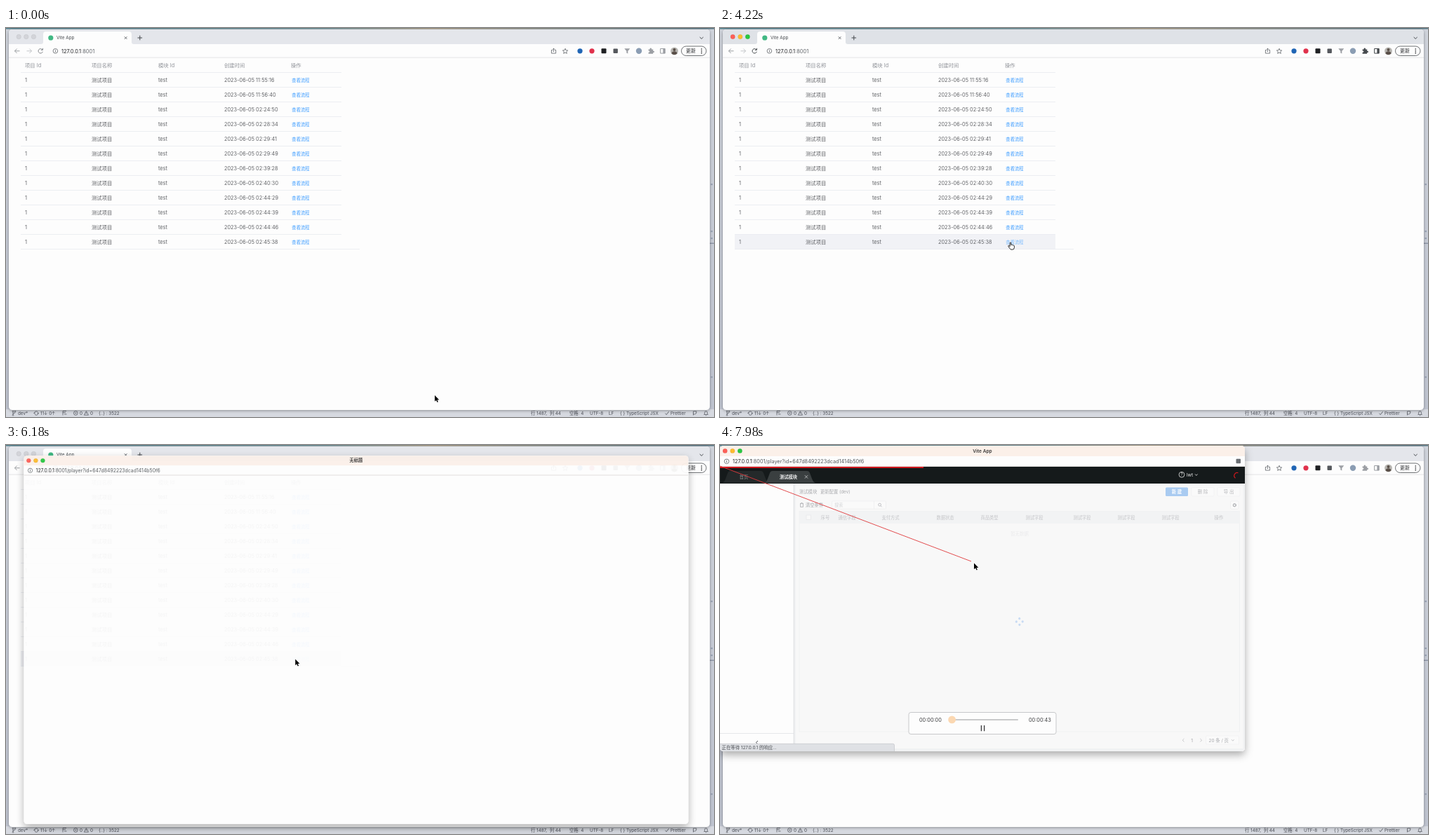
Animation, 1009 px wide and 555 px high, one loop 8000 ms. Source, as an HTML page:

```html
<!DOCTYPE html>
<html lang="zh">
<head>
<meta charset="utf-8">
<title>Vite App</title>
<style>
  html, body { margin: 0; width: 100%; height: 100%; overflow: hidden; background: #d5d8df; }
  svg { display: block; width: 100vw; height: 100vh; }
  text { font-family: Inter, "Noto Sans CJK SC", "Noto Sans CJK", sans-serif; white-space: pre; }
</style>
</head>
<body>
<svg id="stage" viewBox="0 0 1009 555">
  <defs>
    <linearGradient id="strip">
      <stop offset="0" stop-color="#53808c"/><stop offset=".45" stop-color="#6f9096"/>
      <stop offset=".6" stop-color="#a89c86"/><stop offset="1" stop-color="#587683"/>
    </linearGradient>
    <linearGradient id="edge" x2="0" y2="1">
      <stop offset="0" stop-color="#d0d4dc"/><stop offset="1" stop-color="#bfc4d0"/>
    </linearGradient>
    <filter id="shadow" x="-10%" y="-10%" width="120%" height="125%">
      <feDropShadow dx="0" dy="5" stdDeviation="6" flood-opacity=".32"/>
    </filter>
    <filter id="soft" x="-5%" y="-5%" width="110%" height="110%">
      <feDropShadow dx="0" dy="1" stdDeviation="2" flood-opacity=".35"/>
    </filter>
    <clipPath id="frame"><rect id="frameBox" y="1" rx="5"/></clipPath>
  </defs>
</svg>
<script>
const NS = 'http://www.w3.org/2000/svg';
const stage = document.getElementById('stage');
const frameBox = document.getElementById('frameBox');
let layer = stage;

function el(tag, attrs, parent = layer) {
  const node = document.createElementNS(NS, tag);
  set(node, attrs);
  return parent.appendChild(node);
}
function set(node, attrs) {
  for (const k in attrs) node.setAttribute(k, attrs[k]);
}
// Runs a drawing function inside a new group
function group(draw, attrs = {}, parent = layer) {
  const outer = layer, g = el('g', attrs, parent);
  layer = g;
  draw();
  layer = outer;
  return g;
}
const show = (node, on) => { node.style.display = on ? '' : 'none'; };
const rect = (x, y, width, height, fill, more) => el('rect', { x, y, width, height, fill, ...more });
const dot = (cx, cy, r, fill, more) => el('circle', { cx, cy, r, fill, ...more });
const line = (d, stroke, width = 1, more) =>
  el('path', { d, stroke, 'stroke-width': width, fill: 'none', ...more });
const shape = (d, fill, more) => el('path', { d, fill, ...more });
// y is the middle of the line of text
function text(x, y, str, size, fill, more) {
  const node = el('text', { x, y: y + size * 0.365, 'font-size': size, fill, ...more });
  node.textContent = str;
  return node;
}
const mid = { 'text-anchor': 'middle' };
const bold = { 'font-weight': 600 };

function lights(x, y, gap, colors, ring) {
  colors.forEach((c, i) => dot(x + gap * i, y, 3.2, c, { stroke: ring, 'stroke-width': 0.5 }));
}
const LIT = ['#ff5f57', '#febc2e', '#28c840'];
const DIM = ['#d3d4d9', '#d3d4d9', '#d3d4d9'];

function info(x, y, c) {
  dot(x, y, 3.3, 'none', { stroke: c, 'stroke-width': 0.8 });
  line(`M${x} ${y - 0.5}v2.2M${x} ${y - 2}v.9`, c, 0.9);
}

// ---- Editor behind the browser ----
rect(0, 0, 1009, 555, 'url(#edge)');
rect(0, 544, 1009, 11, '#d6d9e0');
rect(0, 0, 1009, 1.6, 'url(#strip)');
for (const y of [223, 290, 300, 498]) rect(1004.5, y - 1, 2.5, 2.2, '#9aa3b5');
rect(1003, 306.5, 6, 1.5, '#8d95a6');

const INK = '#4a4d55';
const status = (x, str) => text(x, 549.5, str, 6.3, INK);
status(17, 'dev*'); status(49, '11↓ 0↑'); status(105, '0'); status(120, '0');
status(132, '{..} : 3522'); status(748, '行 1487,  列 44'); status(803, '空格: 4');
status(832, 'UTF-8'); status(859, 'LF'); status(875, '{ }'); status(884, 'TypeScript JSX');
status(947, 'Prettier');
line('M10 548v3.5M13 548q0 2-3 2', INK, 0.7);
for (const [x, y] of [[10, 547], [13, 547], [10, 552.3]]) dot(x, y, 0.9, 'none', { stroke: INK, 'stroke-width': 0.6 });
line('M40.5 549.5a2.6 2.6 0 0 1 5 -1M45.8 549.7a2.6 2.6 0 0 1 -5 1M39.3 549.5h2.4M44.6 549.6h2.4', INK, 0.7);
line('M81 546.5h5M81 548.7h4M83 551h3.5M81 546.5v6', INK, 0.7);
dot(99.3, 549.5, 2.9, 'none', { stroke: INK, 'stroke-width': 0.7 });
line('M98.2 548.4l2.2 2.2M100.4 548.4l-2.2 2.2M111.3 552.2h6.2l-3.1-5.5ZM114.4 548.7v1.6', INK, 0.7);
line('M939.5 549.8l1.7 1.9 3.4-4.4', INK, 0.8);
line('M979.5 547h4.5q0 4-2 4h-2.5ZM979.5 552.5v-2M994.8 551.5q1-1 1-3a1.8 1.8 0 0 1 3.6 0q0 2 1 3ZM997 552.8h1.2', INK, 0.7);

// ---- Browser window ----
rect(4, 2, 999, 543, '#fdfdfd', { rx: 5, filter: 'url(#soft)' });
const tabStrip = shape('M4 23V7a5 5 0 0 1 5-5H998a5 5 0 0 1 5 5V23Z', '#e4e6eb');
shape('M50 23q3 0 3-3V9q0-4 4-4H175q4 0 4 4V20q0 3 3 3Z', '#fdfdfd');
const dimLights = group(() => lights(18.2, 12.5, 10.6, DIM, '#c3c4c9'));
const litLights = group(() => lights(18.2, 12.5, 10.6, LIT, '#0002'));
dot(63.8, 14, 3.6, '#41b883');
text(72, 14, 'Vite App', 6.3, '#45494d');
line('M168.8 12.3l3.6 3.6M172.4 12.3l-3.6 3.6', '#55595e', 0.9);
line('M187.5 14h6.6M190.8 10.7v6.6', '#45494d', 1);
line('M988.7 13l2.5 2.4 2.5-2.4', '#45494d', 1);
rect(4, 41.7, 999, 0.8, '#dddee0');

const nav = (d, c) => line(d, c, 1);
nav('M19.5 32.8h-7M15.6 29.6l-3.2 3.2 3.2 3.2', '#9b9ea2');
nav('M29.5 32.8h7M33.4 29.6l3.2 3.2-3.2 3.2', '#c4c6c9');
const reload = nav('M51.9 31a3.2 3.2 0 1 0 .4 2.8M52.4 28.8v2.6h-2.6', '#85888c');
info(70.4, 32.8, '#5f6368');
text(79, 32.8, '127.0.0.1', 7.4, '#202124').innerHTML += '<tspan fill="#5f6368">:8001</tspan>';

line('M779 31.5h-1.6v4.6h6.2v-4.6H782M780.5 34v-4.8M778.9 30.7l1.6-1.6 1.6 1.6', '#5f6368', 0.8);
line('M797 29.3l1.1 2.5 2.6.2-2 1.8.6 2.6-2.3-1.4-2.3 1.4.6-2.6-2-1.8 2.6-.2Z', '#5f6368', 0.8);
dot(818, 32.8, 3.6, '#2065b5');
dot(835, 32.8, 3.6, '#e0314b');
rect(848.5, 29.3, 7, 7, '#1f2023', { rx: 1 });
rect(865.5, 29.6, 6.4, 6.4, '#55585d', { rx: 1 });
shape('M881.3 29.3h8l-3 3.6v3.6l-2-1v-2.6Z', '#9da0a5');
dot(902, 32.8, 4.2, '#8b9db3');
const extra = group(() => {
  shape('M915.6 30.6h2q-.5-2 1.2-2t1.2 2h2.2v2.3q1.8-.4 1.8 1t-1.8 1v1.8h-6.6v-2q1.8.2 1.8-1.1t-1.8-1.1Z', 'currentColor');
  line('M932.6 29.5h6.6v6.6h-6.6Z', 'currentColor', 1);
  rect(936.4, 29.5, 2.8, 6.6, 'currentColor');
});
dot(952.5, 32.8, 5.4, '#b7b5b1');
shape('M948.3 36.2q1-3 4.2-3t4.2 3a5.4 5.4 0 0 1-8.4 0Z', '#5a5049');
dot(952.5, 31, 2, '#5a5049');
rect(962.5, 26, 35.5, 13.5, '#fdfdfd', { rx: 6.75, stroke: '#5d6064', 'stroke-width': 0.9 });
text(969, 32.8, '更新', 7, '#26282b');
for (const y of [30, 32.8, 35.6]) dot(991.3, y, 0.85, '#26282b');

// ---- Project table ----
const COLS = [27, 122, 217, 311, 406];
const TIMES = ['11:55:16', '11:56:40', '02:24:50', '02:28:34', '02:29:41', '02:29:49',
  '02:39:28', '02:40:30', '02:44:29', '02:44:39', '02:44:46', '02:45:38'];
const hoverRow = rect(21, 294.5, 457, 21, '#f0f1f5');
['项目 Id', '项目名称', '模块 Id', '创建时间', '操作'].forEach((s, i) => text(COLS[i], 53, s, 7.35, '#909399'));
let link;
TIMES.forEach((time, i) => {
  const y = 74 + 21 * i;
  rect(21, y - 11, 457, 0.8, '#e9ebf1');
  ['1', '测试项目', 'test', '2023-06-05 ' + time].forEach((s, c) => text(COLS[c], y, s, 7.35, '#606266'));
  link = text(407.3, y + 0.3, '查看流程', 6.35, '#409eff', { 'font-weight': 500 });
});
rect(21, 315, 483, 0.8, '#e9ebf1');

// ---- Player popup ----
const GREY = '#c3c4c7';
let backing, urlBar, titleBar, title, page, blank, early, late, progress, spinner, loader, bubble, mark;
const popup = group(() => {
  backing = rect(0, 1, 998, 554, '#fdfdfd', { rx: 5, filter: 'url(#shadow)' });
  group(() => {
    blank = rect(0, 30, 998, 525, '#f1ebe8');
    titleBar = rect(0, 1, 998, 15, '#fbf0e9');
    urlBar = rect(0, 16, 998, 14, '#fdfdfd');
    lights(7.2, 8.4, 10.6, LIT, '#0002');
    title = text(499, 8.4, '', 6.6, '#3c3a39', { ...mid, ...bold });
    info(9.5, 23.3, '#5f6368');
    text(18, 23.3, '127.0.0.1', 7.3, '#202124')
      .innerHTML += '<tspan fill="#54585c">:8001/player?id=647d8492223dcad1414b50f6</tspan>';
    rect(0, 30, 998, 0.8, '#d9d6d5');
    page = group(drawPage);
  }, { 'clip-path': 'url(#frame)' });
});

function drawPage() {
  rect(0, 30.8, 748, 406.2, '#fdfdfd');
  rect(735.5, 19.8, 6.5, 6.5, '#6a6e73', { rx: 1 });
  rect(0, 31, 748, 24, '#151a1b');
  shape('M2 54q4 0 6-6l3-8q1-3 4-3H58q3 0 4 3l3 8q2 6 6 6Z', '#24292a');
  shape('M62 54q4 0 6-6l3-8q1-3 4-3H124q3 0 4 3l3 8q2 6 6 6Z', '#3a3f40');
  text(34, 45.3, '首页', 6.3, '#8f9495', mid);
  text(97.5, 45.3, '测试模块', 6.3, '#f2f2f2', { ...mid, ...bold });
  line('M120.8 43.2l4.4 4.4M125.2 43.2l-4.4 4.4', '#c9cccd', 0.8);
  dot(658, 42.3, 3.9, 'none', { stroke: '#eee', 'stroke-width': 0.8 });
  text(658, 42.3, '?', 6, '#eee', mid);
  text(665, 42.5, 'lwt', 6.6, '#eee');
  line('M677 41.5l1.8 2 1.8-2', '#eee', 0.8);
  progress = rect(0, 31, 60, 1.9, '#d9181e');
  spinner = line('M-3 3A4.3 4.3 0 0 1 3 -3', '#d2161c', 1.2);

  // Sidebar and main panel
  rect(104.8, 55, 1, 382, '#d5d6d9');
  rect(105.8, 55, 642.2, 382, '#f1f2f3');
  rect(108, 57, 637.5, 376, '#f8f8f8');
  rect(0, 411, 105, 0.8, '#e2e3e6');
  line('M54 422l-2.6 2.6 2.6 2.6', '#3c3f44', 0.9);
  rect(113, 94.5, 627.5, 314.5, 'none', { stroke: '#eeeff0', 'stroke-width': 0.8 });
  rect(113, 94.5, 627.5, 17.5, '#f2f3f4');
  rect(635, 60.5, 32, 12.5, '#a9cbf1', { rx: 1.5 });
  text(651, 66.8, '新 建', 6.4, '#fff', { ...mid, ...bold });
  for (const [x, s] of [[688, '删 除'], [725, '导 出']]) {
    rect(x - 16, 60.5, 32, 12.5, '#fafafa', { rx: 1.5, stroke: '#f0f0f1', 'stroke-width': 0.7 });
    text(x, 66.8, s, 6.4, '#b5b6b9', mid);
  }
  rect(727.5, 80, 11.5, 11.5, '#fafafa', { rx: 1.5, stroke: '#ececee', 'stroke-width': 0.7 });
  dot(733.3, 85.8, 2, 'none', { stroke: '#a9abaf', 'stroke-width': 1.2, 'stroke-dasharray': '1.2 .5' });
  dot(733.3, 85.8, 1.8, 'none', { stroke: '#a9abaf', 'stroke-width': 0.7 });
  text(150, 103.3, '序号', 6.4, GREY, mid);
  text(711, 103.3, '操作', 6.4, GREY, mid);
  text(427, 126.3, '暂无数据', 6.4, '#eaeaec', mid);

  early = group(() => {
    text(118, 66.8, '更新配置 (dev)', 6.3, '#c6c7ca', bold);
    text(118, 85.5, '搜索', 6.3, '#e3e4e6');
    dot(182, 85.3, 1.8, 'none', { stroke: '#e0e1e3', 'stroke-width': 0.7 });
    rect(137, 91, 55, 0.7, '#ececee');
    rect(690, 97, 48, 6, '#f8f8f8', { opacity: 0.6 });
    text(677, 421.2, '1', 6.6, '#dadbdd', mid);
    text(701, 421.2, '20 条/页', 6.4, '#cfd0d3');
    line('M665 419l-2 2 2 2M689 419l2 2-2 2M729 420l1.8 2 1.8-2', '#dadbdd', 0.7);
  });
  late = group(() => {
    text(113, 66.8, '测试模块', 6.3, '#a7a8ac');
    text(143, 66.8, '更新配置 (dev)', 6.3, '#a7a8ac');
    line('M114 83.6h5M114.6 83.6v4.8h3.8v-4.8M115.6 82.5h1.8', '#9fa1a5', 0.7);
    text(122, 85.7, '清空条件', 6.3, '#9fa1a5');
    rect(159.5, 80, 77, 11.3, '#fafafa', { rx: 1, stroke: '#ececee', 'stroke-width': 0.7 });
    rect(219, 80, 0.7, 11.3, '#ececee');
    text(163, 85.7, '搜索', 6.3, '#d5d6d8');
    dot(227.6, 85.2, 1.9, 'none', { stroke: '#a9abaf', 'stroke-width': 0.7 });
    line('M229 86.6l1.7 1.7', '#a9abaf', 0.7);
    rect(123, 100, 6.4, 6.4, '#f8f8f8', { stroke: '#e3e4e6', 'stroke-width': 0.6 });
    [[181, '通信字段'], [243, '支付方式'], [321, '数据状态'], [384, '商品类型'], [448, '测试字段'],
     [516, '测试字段'], [579, '测试字段'], [642, '测试字段']]
      .forEach(([x, s]) => text(x, 103.3, s, 6.3, GREY, mid));
    rect(692.5, 415, 47, 12, '#fafafa', { rx: 1.5, stroke: '#efeff1', 'stroke-width': 0.7 });
    text(672.5, 421.2, '1', 6.6, '#a0a2a6', mid);
    text(696.5, 421.2, '20 条 / 页', 6.4, '#a7a9ad');
    line('M661.4 419l-2.2 2.2 2.2 2.2M684.4 419l2.2 2.2-2.2 2.2M729 420.2l1.8 2 1.8-2', '#b0b2b5', 0.7);
  });
  loader = group(() => {
    for (const [x, y] of [[-1, -1], [1, -1], [1, 1], [-1, 1]]) dot(x * 2.5, y * 2.5, 1.3, '#a9c8f0');
  });

  // Playback bar
  rect(269, 381.5, 210, 31, '#fdfdfd', { rx: 3, stroke: '#c2c3c6', 'stroke-width': 0.9 });
  text(284, 392.5, '00:00:00', 7.3, '#3a3b3d');
  text(440, 392.5, '00:00:43', 7.3, '#3a3b3d');
  rect(331, 391.2, 94, 1.5, '#b9babc', { rx: 0.7 });
  dot(330.6, 391.9, 5.4, '#fbd8b2');
  line('M372.4 400v8.3M376.6 400v8.3', '#2f3032', 1.2);
  bubble = group(() => {
    rect(-2, 426.3, 250.5, 13, '#dfe1e5', { rx: 2, stroke: '#c3c5c9', 'stroke-width': 0.7 });
    text(2.5, 431.8, '正在等待 127.0.0.1 的响应...', 6.4, '#4b4e53');
  });
}
mark = shape('M996.5 545.5l3.5 1v3.5Z', '#222');

// ---- Replay trail and pointers ----
const trail = line('', '#e0393c', 0.9);
const ARROW = 'M0 0V8.8L2.1 6.9L3.5 10L4.9 9.4L3.5 6.4H6.3Z';
const pointer = () => shape(ARROW, '#000', { stroke: '#fff', 'stroke-width': 0.7, 'paint-order': 'stroke' });
const replay = pointer();
const arrow = pointer();
const hand = shape('M0 .6q0-1 .8-1t.9 1V3.2q1.2-.7 1.7.2 1.2-.4 1.6.5 1.2-.1 1.2 1V7q0 2.8-2.6 2.8H1.9Q.8 9.8-.4 8L-2.2 5.3q-.6-1.3.6-1.2L0 5.4Z',
  '#fff', { stroke: '#111', 'stroke-width': 0.9 });

// ---- Motion: time, x, y ----
const PATH = [
  [0, 611, 524], [20, 611, 524], [540, 482, 386], [1120, 482, 386], [1840, 434, 316],
  [1960, 434, 316], [2350, 415, 309], [2680, 421.5, 305.5], [3780, 421.5, 305.5],
  [4460, 411, 305.5], [4620, 411, 305.5], [4900, 412.3, 305.5], [6190, 412.3, 305.5],
  [6420, 432, 302], [6740, 986, 20], [8000, 986, 20]
];
const clamp = u => Math.max(0, Math.min(1, u));
const span = (t, a, b) => clamp((t - a) / (b - a));
const smooth = u => u * u * (3 - 2 * u);

function along(t) {
  const i = Math.max(1, PATH.findIndex(p => p[0] > t));
  const [t0, x0, y0] = PATH[i - 1], [t1, x1, y1] = PATH[i];
  const u = smooth(span(t, t0, t1));
  return [x0 + (x1 - x0) * u, y0 + (y1 - y0) * u];
}

const LOOP = 8000, ACTIVE = 4000, PRESS = 5040, BLUR = 5440, OPEN = 5866, LOAD = 7300, SHRINK = 7400;

function render(t) {
  const active = t >= ACTIVE && t < BLUR;
  show(litLights, active);
  show(dimLights, !active);
  set(tabStrip, { fill: active ? '#dfe2e7' : '#e4e6eb' });
  set(reload, { stroke: active ? '#45494d' : '#85888c' });
  extra.style.color = active ? '#45494d' : '#9b9ea3';
  set(hoverRow, { opacity: span(t, ACTIVE, ACTIVE + 250) });
  set(link, { fill: t >= PRESS ? '#a0cfff' : t >= ACTIVE ? '#79bbff' : '#409eff' });

  // Popup zooms and fades in together
  const s = 1 - (1 - span(t, OPEN, OPEN + 407)) ** 2;
  const loaded = t >= LOAD, small = t >= SHRINK;
  show(popup, s > 0);
  set(popup, { opacity: s, transform: `translate(${499 * (1 - s)} ${278 * (1 - s)}) scale(${s})` });
  const width = small ? 748 : 998, height = small ? 436 : 554;
  for (const box of [backing, frameBox]) set(box, { width, height });
  set(title, { x: width / 2 });
  title.textContent = loaded ? 'Vite App' : '无标题';
  show(page, loaded);
  show(blank, loaded);
  show(mark, loaded && !small);

  const ms = t - LOAD, full = t >= 7500;
  show(early, !full);
  show(late, full);
  show(bubble, full);
  set(progress, { width: 61 + 229 * span(t, LOAD, 7980) });
  set(spinner, { transform: `translate(736.5 43.5) rotate(${90 + ms * 0.9})` });
  const drop = span(t, SHRINK, 7500);
  set(loader, {
    transform: `translate(426.8 ${244 + 8 * drop}) rotate(${20 + ms * 0.3}) scale(${1 + 0.25 * drop})`,
    opacity: 1 - 0.4 * drop
  });

  // Replayed pointer with its red trail
  const u = span(t, 7440, 7960);
  const x = 358 * u, y = 30 + 136 * u;
  show(trail, u > 0);
  show(replay, loaded);
  set(trail, { d: `M0 30L${x} ${y}` });
  set(replay, { transform: `translate(${x + 4 * u} ${y + 5 - 2.5 * u})` });

  const [px, py] = along(t);
  show(arrow, !active && !loaded);
  show(hand, active);
  set(arrow, { transform: `translate(${px} ${py})` });
  set(hand, { transform: `translate(${px - 0.8} ${py + 0.8})` });
}

const start = performance.now();
function tick() {
  render((performance.now() - start) % LOOP);
  requestAnimationFrame(tick);
}
tick();
</script>
</body>
</html>
```
